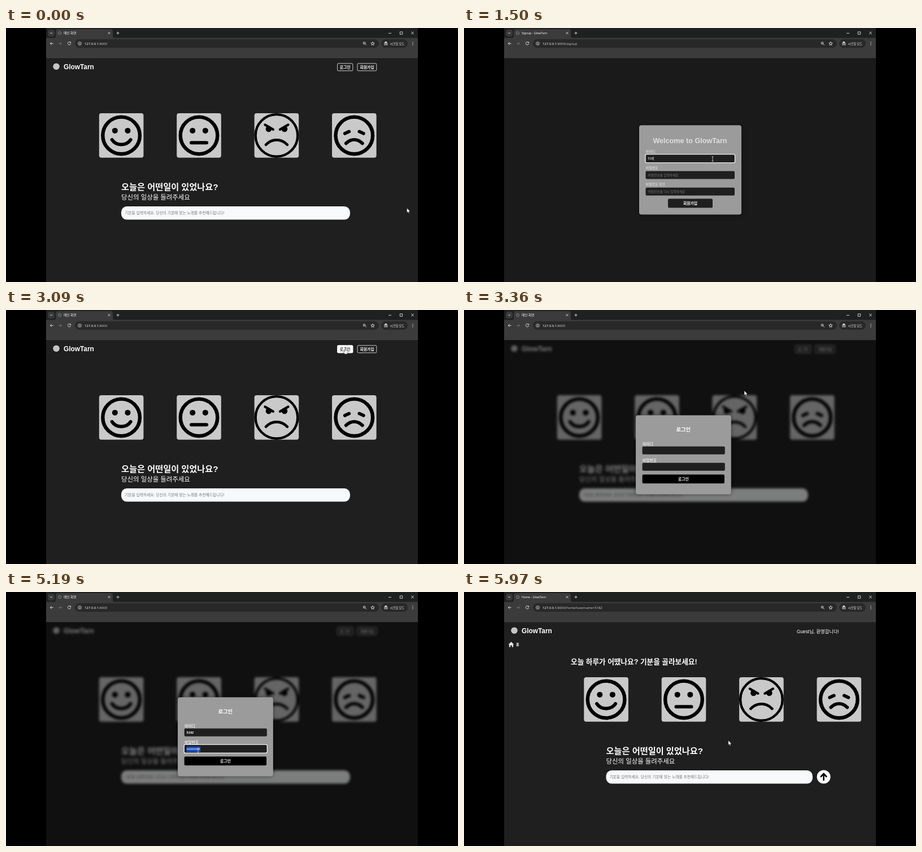
These frames come from a looping animation (800 by 450 pixels, 6 s). An HTML page:

```html
<!DOCTYPE html>
<html>
<head>
<meta charset="utf-8">
<title>GlowTarn</title>
<style>
html, body { margin: 0; width: 100%; height: 100%; overflow: hidden; background: #000; }
svg { display: block; width: 800px; height: 450px; }
text { font-family: "Liberation Sans", "Noto Sans CJK KR", "Noto Sans CJK", sans-serif; fill: #fff; }
.ui text { font-family: "Noto Sans", "Noto Sans CJK KR", "Noto Sans CJK", sans-serif; }
.b { font-weight: 700; }
.mid { text-anchor: middle; }
.line { fill: none; stroke: #e3e3e3; stroke-width: .9; }
.ink { fill: none; stroke: #000; stroke-linecap: round; }
.dim { filter: blur(2.3px) brightness(.5); }
.card { fill: #9b9b9b; filter: drop-shadow(0 0 3px rgba(0, 0, 0, .5)); }
</style>
</head>
<body>
<svg id="stage" viewBox="0 0 800 450"></svg>
<script>
const BRAND = 'GlowTarn', USER = '5182', LOOP = 6000, FRAME = 30;
const stage = document.getElementById('stage');

// Markup helpers; "on" lists the time ranges in which a part is visible.
const text = (x, y, size, str, cls = '', fill = '#fff') =>
  `<text x="${x}" y="${y}" font-size="${size}" class="${cls}" style="fill:${fill}">${str}</text>`;
const rect = (x, y, w, h, r, fill, extra = '') =>
  `<rect x="${x}" y="${y}" width="${w}" height="${h}" rx="${r}" fill="${fill}" ${extra}/>`;
const dot = (x, y, r, fill, extra = '') => `<circle cx="${x}" cy="${y}" r="${r}" fill="${fill}" ${extra}/>`;
const path = (d, extra = 'class="line"') => `<path d="${d}" ${extra}/>`;
const ink = (d, w) => path(d, `class="ink" stroke-width="${w}"`);
const on = (ranges, body) => `<g data-on="${ranges}">${body}</g>`;

const MAIN = '0-690 2640-5820', SIGNUP = '690-2640', HOME = '5820-6000';

// Browser window
const chrome = () => `<g class="ui">
  ${rect(71, 0, 658, 18, 0, '#1f2020')}
  ${rect(71, 17.5, 658, 35.5, 0, '#3b3b3b')}
  ${path('M71 52.8H729', 'stroke="#484848" stroke-width=".6"')}
  ${rect(74, 3, 12, 12, 3.5, '#373838')}
  ${path('M78 8l2 2 2-2')}
  ${path('M84 18q4 0 4-4V6q0-4 4-4h93q4 0 4 4v8q0 4 4 4z', 'fill="#3b3b3b"')}
  ${dot(95, 9, 2.7, 'none', 'stroke="#858585" stroke-width=".8"')}
  ${path('M93.2 7.2l3.6 3.6', 'stroke="#858585" stroke-width=".8"')}
  ${on(MAIN, text(102, 11.2, 5.7, '메인 화면'))}
  ${on(SIGNUP, text(102, 11.2, 5.3, 'Signup - ' + BRAND))}
  ${on(HOME, text(102, 11.2, 5.3, 'Home - ' + BRAND))}
  ${path('M180.7 7.2l3.6 3.6m0-3.6l-3.6 3.6M195.5 9h5M198 6.5v5')}
  ${path('M677 9.3h5M697.3 6.8h4.4v4.4h-4.4zM717.2 6.6l4.6 4.6m0-4.6l-4.6 4.6')}
  ${path('M83.5 27.5h-5.2m2.5-2.5l-2.5 2.5 2.5 2.5')}
  ${path('M93 27.5h5.2m-2.5-2.5l2.5 2.5-2.5 2.5', 'class="line" style="stroke:#777"')}
  ${path('M114.2 25.7a2.7 2.7 0 1 0 .4 2.3M114.6 24.4v2h-2')}
  ${rect(122, 20, 538, 15, 7.5, '#282828')}
  ${dot(130.5, 27.5, 4.8, '#3b3b3b')}
  ${dot(130.5, 27.5, 2.5, 'none', 'stroke="#ddd" stroke-width=".7"')}
  ${path('M130.5 27.2v1.6M130.5 25.9v.6', 'stroke="#ddd" stroke-width=".7"')}
  <text x="139" y="29.7" font-size="5.9">127.0.0.1<tspan fill="#c4c4c4" id="rest"></tspan></text>
  ${dot(634.2, 26.8, 2, 'none', 'stroke="#e3e3e3" stroke-width=".8"')}
  ${path('M635.7 28.3l2.2 2.2M633.2 26.8h2')}
  ${path('M649 24.4l.9 2.1 2.3.2-1.8 1.5.6 2.2-2-1.2-2 1.2.6-2.2-1.8-1.5 2.3-.2z')}
  ${rect(664, 20, 47, 15, 7.5, '#282828')}
  ${path('M670.3 26.3l.6-2.3h2.8l.6 2.3zM668.8 26.5h7v.8h-7z', 'fill="#e3e3e3"')}
  ${dot(670.6, 29.2, 1.2, 'none', 'stroke="#e3e3e3" stroke-width=".8"')}
  ${dot(674, 29.2, 1.2, 'none', 'stroke="#e3e3e3" stroke-width=".8"')}
  ${text(679.5, 29.5, 5.3, '시크릿 모드')}
  ${[25, 27.5, 30].map(y => dot(720, y, .7, '#e3e3e3')).join('')}
</g>`;

// Mood tiles, drawn around their centre
const ring = (r, w) => dot(0, 0, r, 'none', `stroke="#000" stroke-width="${w}"`);
const eyes = dot(-11.3, -8.5, 5, '#000') + dot(11.3, -8.5, 5, '#000');
const faces = [
  ring(32.8, 6.4) + eyes + ink('M-16.5 7.5Q-11 16 0 16T16.5 7.5', 6),
  ring(32.8, 6.4) + eyes + ink('M-13.5 12.8H13.5', 6),
  ring(37.3, 4.4) + ink('M-20.5-19L-6-10.5M20.5-19L6-10.5', 4.2) +
    dot(-14, -11.5, 5.3, '#000') + dot(14, -11.5, 5.3, '#000') + ink('M-19 16.5Q-11 8 0 8T19 16.5', 4.6),
  ring(32.8, 6.4) + ink('M-16.5-3.5L-9-7M16.5-3.5L9-7', 5.8) + ink('M-14.5 14Q-8 7.5 0 7.5T14.5 14', 5.8)
];
const tiles = x0 => faces.map((face, i) =>
  `<g transform="translate(${x0 + 137.4 * i} 190.4)">${rect(-39.3, -39.3, 78.6, 78.6, 4, '#c9c9c9')}${face}</g>`).join('');

const page = (x, inputW) => `
  ${rect(30, 20, 740, 470, 0, '#1f1f1f')}
  ${dot(89, 68.2, 5.8, '#c4c4c4')}
  ${text(102, 73.2, 11.85, BRAND, 'b')}
  ${tiles(x)}
  ${text(x, 287, 15.2, '오늘은 어떤일이 있었나요?', 'b')}
  ${text(x, 304.2, 11.4, '당신의 일상을 들려주세요')}
  ${rect(x - .2, 316, inputW, 23.6, 10, '#f8f9fa')}
  ${text(x + 5.8, 330.2, 6.75, '기분을 입력하세요. 당신의 기분에 맞는 노래를 추천해드립니다!', '', '#757575')}`;

const navButton = (x, w, label, hover) => {
  const draw = (bg, fg) => rect(x, 62.8, w, 13, 1.5, bg, 'stroke="#f4f4f4" stroke-width=".8"') +
    text(x + w / 2, 72.2, 6.8, label, 'mid b', fg);
  return draw('none', '#fff') + on(hover, draw('#fff', '#333'));
};

const mainPage = () => `<g id="main">${page(204.1, 405)}
  ${navButton(586.6, 27.2, '로그인', '3030-3210')}
  ${navButton(622, 33.8, '회원가입', '360-690')}</g>`;

const homePage = () => page(251.6, 365.6) + `
  ${text(589, 72.8, 8.3, 'Guest님, 환영합니다!')}
  ${path('M78.6 93l4.9-4.7 4.9 4.7h-1.3v4.4h-2.3v-3h-2.6v3h-2.3V93z', 'fill="#e6e6e6"')}
  ${text(92, 95.4, 6.2, '홈', 'b')}
  ${text(189, 128.4, 12.65, '오늘 하루가 어땠나요? 기분을 골라보세요!', 'b')}
  ${dot(636.6, 327.6, 12, '#fff')}
  ${path('M636.6 333.2v-10.6M631.8 327l4.8-5 4.8 5', 'class="ink" stroke-width="2.6"')}`;

// Form fields: focus windows and how many characters are typed at time t
const typed = (t, start, step, total) => Math.max(0, Math.min(total, Math.floor((t - start) / step) + 1));
const fields = [
  { x: 321.5, y: 224.2, w: 157.5, label: '아이디', hint: '아이디를 입력하세요', shown: true,
    focus: [[1350, 1860]], len: t => typed(t, 1380, 60, 4) },
  { x: 321.5, y: 253.5, w: 157.5, label: '비밀번호', hint: '비밀번호를 입력하세요',
    focus: [[1860, 2160]], len: t => typed(t, 1980, 30, 4) },
  { x: 321.5, y: 282.8, w: 157.5, label: '비밀번호 확인', hint: '비밀번호를 다시 입력하세요',
    focus: [[2160, 2550]], len: t => t < 2340 ? typed(t, 2220, 30, 2) : typed(t, 2280, 30, 4) },
  { x: 315.6, y: 241.7, w: 146.2, label: '아이디', hint: '', shown: true, login: true,
    focus: [[3540, 3750]], len: t => typed(t, 3570, 30, 4) },
  { x: 315.6, y: 270.8, w: 146.2, label: '비밀번호', hint: '', login: true,
    focus: [[3750, 4200], [4980, 5700]], len: t => t < 5250 ? typed(t, 3900, 15, 12) : typed(t, 5310, 30, 4) }
];
const fieldMarkup = (f, i) => {
  const size = f.login ? 6.8 : 5.9;
  return text(f.x + .3, f.y - (f.login ? 1.5 : 3.4), size, f.label, 'b', f.login ? '#e8e8e8' : '#d4d4d4') +
    rect(f.x, f.y, f.w, 14, 2, '#1f1f1f') +
    `<rect id="ring${i}" x="${f.x - .5}" y="${f.y - .5}" width="${f.w + 1}" height="15" rx="2.3" fill="none" stroke="#fff" stroke-width="1.1"/>` +
    (i === 4 ? on('5190-5250', rect(319.6, 274, 24.5, 9, 0, '#1a56c4')) : '') +
    `<text id="value${i}" x="${f.x + 4}" y="${f.y + 9.1}" font-size="5.7"></text>` +
    `<path id="caret${i}" d="M0 ${f.y + 3.8}v6.6" stroke="#fff" stroke-width=".6"/>`;
};
const form = login => fields.map((f, i) => !!f.login === login ? fieldMarkup(f, i) : '').join('');

const signupPage = () => `
  ${rect(71, 53, 658, 397, 0, '#1a1a1a')}
  ${rect(310, 172.3, 181, 158.2, 4, '#9b9b9b', 'class="card"')}
  ${text(400, 203.6, 12.6, 'Welcome to ' + BRAND, 'b mid', '#dedede')}
  ${form(false)}
  ${rect(361, 302.6, 79, 16, 2, '#1f1f1f')}
  ${text(400.5, 313.1, 6.8, '회원가입', 'b mid')}`;

const loginBox = () => `
  ${rect(304, 186.6, 168.8, 139.8, 4, '#9b9b9b', 'class="card"')}
  ${text(388.3, 215.2, 9.3, '로그인', 'b mid')}
  ${form(true)}
  ${rect(315.6, 291.4, 145.4, 15.8, 2, '#000')}
  ${on('4170-4560 5640-5820', rect(315.6, 291.4, 145.4, 15.8, 2, '#444'))}
  ${text(388.3, 302, 6.8, '로그인', 'b mid')}`;

const alertBox = () => `<g id="alert" class="ui">
  ${rect(301.5, 35.3, 197, 58.8, 4, '#1f1f1f', 'stroke="#3a3a3a" stroke-width=".6"')}
  ${text(311, 46.6, 7, '127.0.0.1:8000 내용:', '', '#e3e3e3')}
  ${text(311, 59.4, 6.2, '로그인 실패: 잘못된 아이디 또는 비밀번호', '', '#c7c7c7')}
  ${rect(460.6, 67.8, 29.8, 18, 9, 'none', 'stroke="#a8c7fa" stroke-width="1.2"')}
  ${rect(462.2, 69.4, 26.6, 14.8, 7.4, '#a8c7fa')}
  ${text(475.5, 79, 6, '확인', 'mid', '#062e6f')}</g>`;

const cursors = `<g id="cursor">
  <path id="arrow" d="M0 0v8.2l1.9-1.7 1.3 2.8 1.4-.6-1.3-2.7h2.6z" fill="#fff" stroke="#111" stroke-width=".5"/>
  <path id="hand" d="M-.8 .8Q0-.6.8.8V4l3 .7q1 .3.9 1.4L4 9.3 3.4 11H-1L-3.4 7.4Q-3.7 6-2.3 6.2L-.8 7.4z" fill="#fff" stroke="#111" stroke-width=".5"/>
  <path id="beam" d="M-1.5-4h3M0-4v8M-1.5 4h3" fill="none" stroke="#e0e0e0" stroke-width=".8"/></g>`;

stage.innerHTML = `<clipPath id="view"><rect x="71" y="53" width="658" height="397"/></clipPath>
  <g clip-path="url(#view)">${on(MAIN, mainPage())}${on(SIGNUP, signupPage())}${on(HOME, homePage())}
  ${on('3210-5820', loginBox())}</g>${chrome()}${alertBox()}${cursors}`;

// Pointer keys: time, x, y of the hot spot
const moves = [
  [60, 709.5, 319], [420, 641, 67], [689, 641, 67], [690, 644, 72], [1230, 440, 232],
  [1590, 440, 232], [1830, 443, 262], [2070, 443, 262], [2160, 445, 286], [2370, 445, 286],
  [2550, 400, 311], [2670, 400, 311], [3060, 600.5, 67], [3240, 600.5, 67], [3510, 350, 249],
  [3660, 350, 249], [3750, 352, 279], [4050, 352, 279], [4200, 367.5, 294], [4290, 367.5, 294],
  [4500, 472, 73], [4530, 472, 73], [4980, 340, 281], [5400, 340, 281], [5640, 365, 294],
  [5790, 365, 294], [5970, 467.8, 263]
];
const shapes = [
  [0, 'arrow'], [360, 'hand'], [690, 'arrow'], [1170, 'beam'], [2490, 'hand'], [2640, 'arrow'],
  [3030, 'hand'], [3210, 'arrow'], [3450, 'beam'], [4170, 'hand'], [4320, 'arrow'], [4920, 'beam'],
  [5610, 'hand'], [5820, 'arrow']
];

const el = id => document.getElementById(id);
const within = (t, list) => list.some(([a, b]) => t >= a && t < b);
const ramp = (t, a, b) => Math.max(0, Math.min(1, (t - a) / (b - a)));
const show = (node, yes) => { node.style.display = yes ? '' : 'none'; };
const timed = [...stage.querySelectorAll('[data-on]')].map(node =>
  ({ node, spans: node.dataset.on.split(' ').map(s => s.split('-').map(Number)) }));

function pointer(t) {
  const i = moves.findIndex(m => m[0] > t);
  if (i === 0) return moves[0].slice(1);
  if (i < 0) return moves[moves.length - 1].slice(1);
  const [ta, xa, ya] = moves[i - 1], [tb, xb, yb] = moves[i];
  const p = ramp(t, ta, tb), e = p * p * (3 - 2 * p);
  return [xa + (xb - xa) * e, ya + (yb - ya) * e];
}

function render(t) {
  timed.forEach(({ node, spans }) => show(node, within(t, spans)));
  el('main').classList.toggle('dim', t >= 3210);
  el('rest').textContent = ':8000' +
    (t >= 5820 ? '/home?username=' + USER : t >= 690 && t < 2640 ? '/signup' : '');

  fields.forEach((f, i) => {
    const n = f.len(t), focused = within(t, f.focus), value = el('value' + i);
    value.textContent = n ? (f.shown ? USER.slice(0, n) : '•'.repeat(n)) : f.hint;
    value.style.fill = n ? '#fff' : '#777';
    value.style.fontWeight = n && f.login ? 700 : 400;
    show(el('ring' + i), focused);
    show(el('caret' + i), focused && !(t >= 5190 && t < 5250));
    el('caret' + i).setAttribute('transform', `translate(${f.x + 4.2 + n * (f.shown ? 3.17 : 2)} 0)`);
  });

  el('alert').style.opacity = ramp(t, 4200, 4380) * (1 - ramp(t, 4500, 4620));

  const shape = shapes.filter(s => s[0] <= t).pop()[1];
  ['arrow', 'hand', 'beam'].forEach(id => show(el(id), id === shape));
  el('cursor').setAttribute('transform', `translate(${pointer(t).join(' ')})`);
}

let start;
function tick(now) {
  start ??= now;
  render(Math.floor(((now - start) % LOOP) / FRAME) * FRAME);
  requestAnimationFrame(tick);
}
render(0);
requestAnimationFrame(tick);
</script>
</body>
</html>
```
